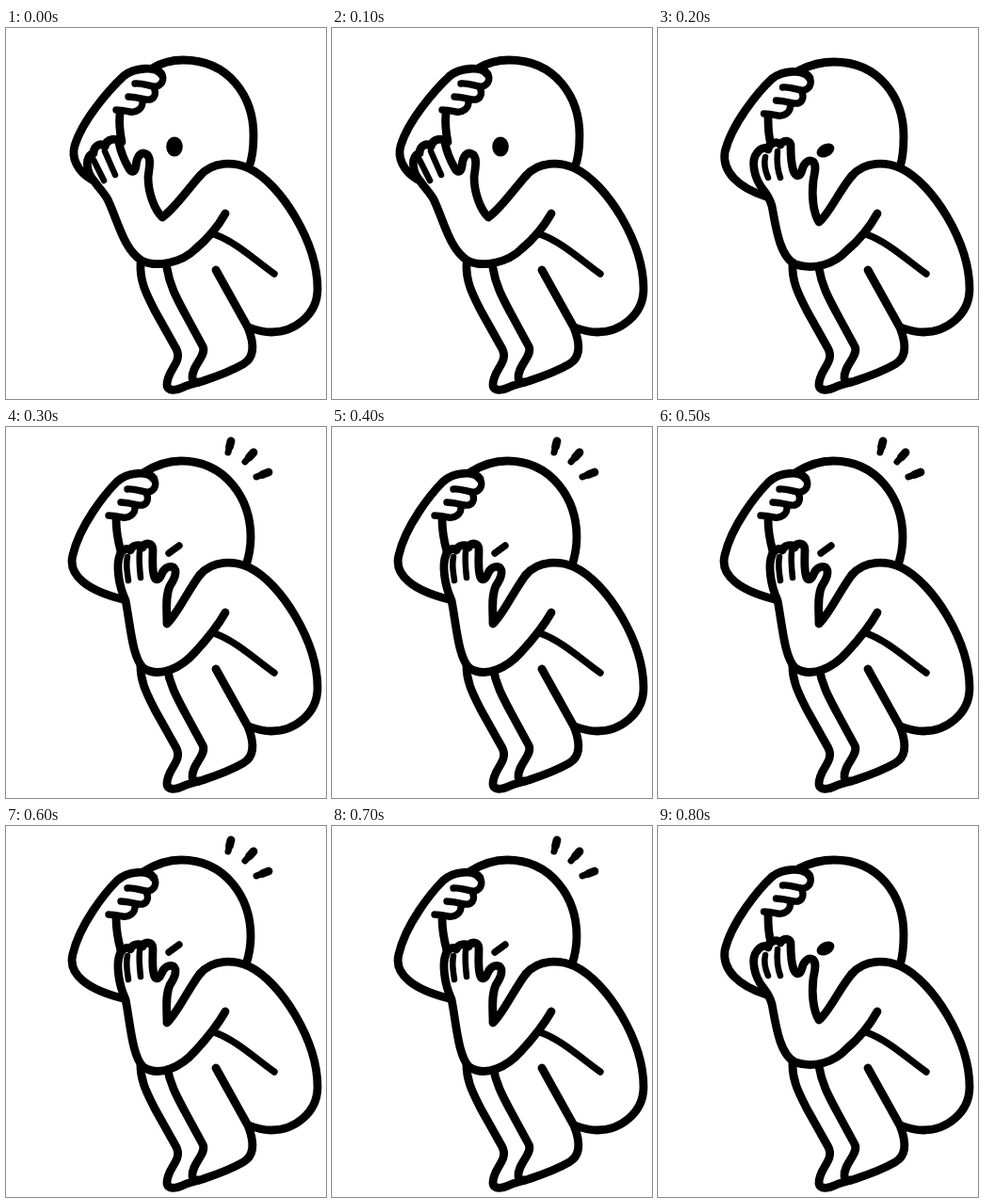
An HTML page for the animation above (0.9 s loop, 340 by 394 pixels).

```html
<!DOCTYPE html>
<html lang="en">
<head>
<meta charset="utf-8">
<title>Crouching figure</title>
<style>
  html, body { margin: 0; width: 100%; height: 100%; overflow: hidden; background: #fff; }
  svg { display: block; width: 100%; height: 100%; }
  path { fill: none; stroke: #000; stroke-width: 8.8; stroke-linecap: round; stroke-linejoin: round; }
  .arm { fill: #fff; }
  .crease { stroke-width: 6.5; }
  .finger { stroke-width: 7.4; }
  .spark { stroke-width: 7; }
</style>
</head>
<body>
<svg viewBox="0 0 340 394">
  <defs>
    <g id="fingers">
      <path class="finger" d="M137 59C146 58 154 63 160 62C167 60 169 52 164 47"/>
      <path class="finger" d="M157 63C161 72 156 77 149 76C142 75 137 73 130 73"/>
      <path class="finger" d="M145 77C146 86 138 90 132 89C127 88 122 87 117 87"/>
    </g>
  </defs>

  <!-- legs -->
  <path d="M143 250C142 270 150 284 158 300L181 341C188 355 171 363 171 379C171 386 181 385 187 382C193 379 199 378 205 376"/>
  <path d="M171 255C174 274 182 288 190 303L209 338C214 348 197 358 198 372C199 377 204 377 209 375C224 370 240 364 252 357C266 349 263 333 257 318L223 257"/>

  <g id="poses"></g>

  <!-- back and thigh -->
  <path d="M206 157C220 141 242 142 258 149C292 165 331 228 331 277C331 305 306 323 282 323C274 323 266 321 258 318"/>
  <path class="finger" d="M221 219C244 227 264 246 285 261"/>
</svg>
<script>
const STEP = 100;
const poses = {
  open: {
    head: 'M155 43C165 37 176 34 188 34C238 34 263 74 263 114C263 128 262 138 258 148',
    face: 'M121 91C120 101 121 111 123 121',
    backArm: 'M91 161C76 152 69 138 73 125C81 98 110 65 125 51C136 42 159 40 165 49',
    arm: 'M233 197C224 213 213 225 201 235C187 249 160 255 144 247C125 235 119 205 108 182' +
         'C104 175 98 169 94 163C84 152 84 135 93 133C93 124 103 121 105 126' +
         'C107 117 119 116 120 122C122 132 126 141 130 148C133 154 137 154 138 147' +
         'C139 135 144 131 149 134C155 137 152 150 151 158C151 176 158 193 166 201C178 193 191 174 206 157',
    creases: 'M93 140L104 162M105 131L116 156',
    hand: [0, 0],
    eye: [179, 126, 8.8, 10.5, 0]
  },
  wince: {
    head: 'M150 45C162 39 174 36 187 36C235 36 261 74 261 115C261 128 260 139 257 148',
    face: 'M117 95C117 105 117 114 120 123',
    backArm: 'M115 179C86 170 68 153 71 132C78 102 107 67 121 54C132 45 155 43 161 53',
    arm: 'M233 197C224 213 213 226 201 236C188 250 167 258 146 251C129 243 125 210 121 189' +
         'C119 182 116 177 112 172C101 158 99 140 105 133C109 127 115 126 117 129' +
         'C118 121 128 120 130 124C133 118 142 119 141 126C141 137 142 146 144 152' +
         'C147 159 151 158 153 151C155 143 160 139 165 142C169 147 166 155 165 162' +
         'C163 179 165 196 171 206C181 199 193 172 206 157',
    creases: 'M114 137C112 145 114 152 117 159M127 131C126 142 127 151 130 159',
    hand: [-4.5, 4],
    eye: [178, 130, 10, 6.8, -27]
  },
  hurt: {
    head: 'M147 48C160 40 173 36 186 36C233 36 260 76 260 117C260 129 258 138 255 147',
    face: 'M117 98C117 109 119 121 122 132',
    backArm: 'M124 183C88 174 65 158 71 136C78 105 105 71 118 58C129 48 151 46 157 55',
    arm: 'M233 197C224 213 213 226 201 239C186 256 163 267 146 256C134 245 132 209 127 184' +
         'C119 167 117 146 121 136C123 130 129 128 132 131C134 125 143 124 145 128' +
         'C148 122 156 123 156 130C156 139 155 149 157 157C158 163 162 164 165 157' +
         'C168 150 173 147 178 149C183 154 178 163 174 169C169 180 171 195 171 209C182 199 193 174 206 157',
    creases: 'M129 138C127 147 129 155 130 163M142 132C141 142 142 151 143 160',
    hand: [-8, 7],
    blink: 'M173 134L184 126',
    sparks: [[239, 15, 236, 27], [263, 27, 254, 37], [279, 48, 266, 53]]
  }
};
const sequence = ['open', 'open', 'wince', 'hurt', 'hurt', 'hurt', 'hurt', 'hurt', 'wince'];

const stroke = (d, cls = '') => `<path class="${cls}" d="${d}"/>`;

// A short dash, wide at its outer end.
function spark([x1, y1, x2, y2]) {
  const mid = `${(x1 + x2) / 2} ${(y1 + y2) / 2}`;
  return stroke(`M${x1} ${y1}L${x2} ${y2}`, 'spark') + stroke(`M${x1} ${y1}L${mid}`);
}

function draw(p) {
  const eye = p.eye
    ? `<ellipse rx="${p.eye[2]}" ry="${p.eye[3]}" transform="translate(${p.eye[0]} ${p.eye[1]}) rotate(${p.eye[4]})"/>`
    : stroke(p.blink, 'finger');
  return stroke(p.head) + stroke(p.face) + stroke(p.backArm) +
    `<use href="#fingers" transform="translate(${p.hand})"/>` +
    eye + stroke(p.arm, 'arm') + stroke(p.creases, 'crease') +
    (p.sparks || []).map(spark).join('');
}

const layer = document.getElementById('poses');
layer.innerHTML = Object.entries(poses)
  .map(([name, pose]) => `<g data-pose="${name}">${draw(pose)}</g>`).join('');

const start = performance.now();
function render(now) {
  const step = Math.floor(Math.max(0, now - start) / STEP) % sequence.length;
  for (const g of layer.children) {
    g.style.display = g.dataset.pose === sequence[step] ? '' : 'none';
  }
  requestAnimationFrame(render);
}
render(start);
</script>
</body>
</html>
```
